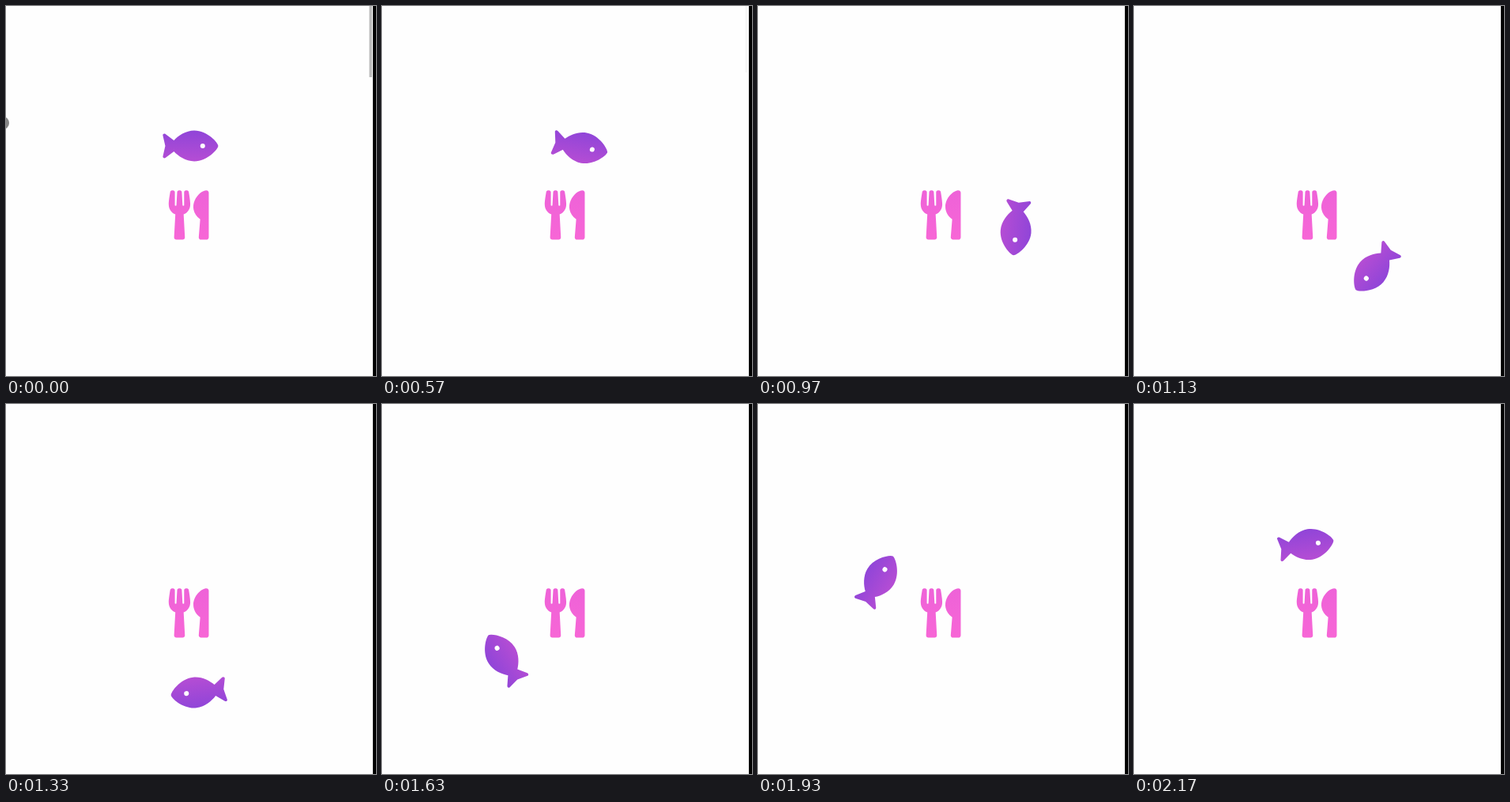
An HTML page that plays this animation: 468x468 px, repeating every 2210 ms.

```html
<!DOCTYPE html>
<html lang="en">
<head>
<meta charset="utf-8">
<title>Fish around cutlery</title>
<style>
  html, body { margin: 0; width: 100%; height: 100%; overflow: hidden; background: #fefefe; }
  svg { display: block; width: 100%; height: 100%; }
</style>
</head>
<body>
<svg viewBox="0 0 468 468">
  <defs>
    <linearGradient id="violet" x2="0" y2="1">
      <stop stop-color="#9045d8"/>
      <stop offset="1" stop-color="#b54dd4"/>
    </linearGradient>
    <linearGradient id="pink" x2="0" y2="1">
      <stop stop-color="#ee62d8"/>
      <stop offset="1" stop-color="#f766d6"/>
    </linearGradient>
  </defs>

  <circle id="dot" cx="-4" cy="148" r="8" fill="#858585"/>
  <rect id="thumb" x="459.5" width="3.5" height="90" fill="#bababa"/>
  <rect x="464" width="4" height="468"/>

  <path fill="url(#pink)" transform="translate(205.8 233.2) scale(.1218)" d="M208 15c1 5 16 95 16 129 0 52-28 90-69 105l13 238c1 14-10 25-24 25H80c-14 0-25-11-24-25l13-238C28 234 0 196 0 144 0 110 15 20 16 15 19-5 61-5 64 16v141c1 4 15 4 16 0l8-141c3-21 45-21 48 0l8 141c1 4 15 4 16 0V16c3-21 45-21 48-1zm119 286l-15 185c-1 14 10 26 24 26h56c13 0 24-11 24-24V24c0-13-11-24-24-24-82 0-221 178-65 301z"/>

  <g id="orbit">
    <g transform="translate(233.4 177) scale(.1215) translate(-288 -256)">
      <path fill="url(#violet)" d="M327 96c-90 0-168 55-212 102L27 132c-12-9-30 0-27 14l25 110L0 366c-3 14 15 23 27 14l88-66c44 47 122 102 212 102 137 0 249-128 249-160S464 96 327 96z"/>
      <circle cx="414.5" cy="256" r="25" fill="#fefefe"/>
    </g>
  </g>
</svg>
<script>
  const LOOP = 2210, TICK = 100 / 3;
  const START = 15.5, DEGREES = 7.08; // in ticks, and per tick
  const [dot, thumb, orbit] = ['dot', 'thumb', 'orbit'].map(id => document.getElementById(id));
  const clamp = v => Math.min(1, Math.max(0, v));

  function draw(now) {
    const tick = Math.floor((now % LOOP + 3.4) / TICK);
    const angle = Math.min(360, Math.max(0, tick - START) * DEGREES);
    orbit.setAttribute('transform', `rotate(${angle} 233.1 271)`);
    dot.setAttribute('visibility', tick < 11 ? 'visible' : 'hidden');
    thumb.setAttribute('height', tick < 3 ? 90 : 84);
    thumb.setAttribute('opacity', clamp((19 - tick) / 16));
  }

  const begin = performance.now();
  function frame() {
    draw(performance.now() - begin);
    requestAnimationFrame(frame);
  }
  frame();
</script>
</body>
</html>
```
